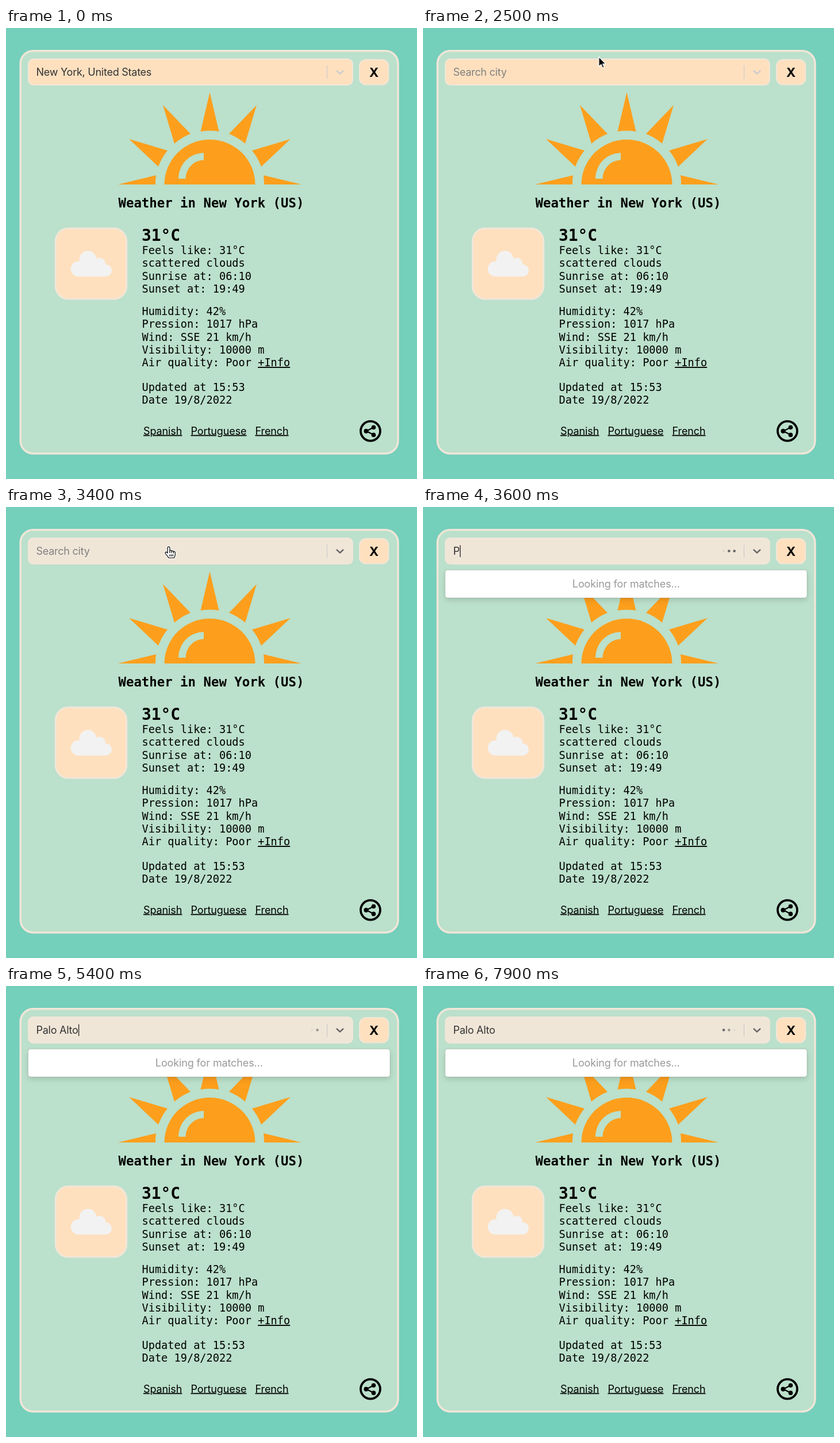
Animation, 715 px wide and 784 px high, one loop 8 s. Source, as an HTML page:

```html
<!DOCTYPE html>
<html lang="en">
<head>
<meta charset="utf-8">
<title>Weather</title>
<style>
  html, body { margin: 0; width: 100%; height: 100%; overflow: hidden; background: #74cfbb; }
  svg { display: block; width: 715px; height: 784px; }
  :root { --cream: #f0e6d8; --peach: #fee0bf; --mint: #bbe0cb; --teal: #74cfbb; }

  .ui { font: 18px Inter, "Open Sans", sans-serif; letter-spacing: -.25px; }
  .link { letter-spacing: -.1px; text-decoration: underline; }
  .mono { font: 18.63px "DejaVu Sans Mono", monospace; white-space: pre; }
  .title { font-size: 22.35px; font-weight: bold; }
  .temp { font-size: 27.9px; font-weight: bold; }
  .u { text-decoration: underline; }
  .box { fill: var(--peach); stroke: var(--cream); }

  .loop { animation: 8s linear infinite; }
  .button { animation-name: button; }
  .cross { animation-name: cross; font: bold 22px Inter, sans-serif; text-anchor: middle; }
  .field { animation-name: field; }
  .chevron { animation-name: chevron; fill: none; stroke-width: 2.6; stroke-linecap: round; stroke-linejoin: round; }
  .cursor { animation-name: move; }
  .hand { animation-name: hand; }
  .arrow { animation-name: arrow; }
  .ring { animation-name: ring; }
  .search { animation-name: search; }
  .lead2 { animation-name: lead2; }
  .lead3 { animation-name: lead3; }
  .hand, .arrow, .ring, .search, .lead2, .lead3 { animation-timing-function: step-end; }
  .menu { filter: drop-shadow(0 4px 5px rgba(0, 0, 0, .13)); }
  .dot { animation: pulse 1s ease-in-out infinite; }

  @keyframes button {
    0%, 14.7%, 30.5%, 100% { fill: #fee0bf; }
    17.3%, 28% { fill: #f0e6d8; }
  }
  @keyframes cross {
    0%, 14.7%, 30.5%, 100% { fill: #000; }
    17.3%, 28% { fill: #74cfbb; }
  }
  @keyframes field {
    0%, 32.2% { fill: #fee0bf; }
    35%, 100% { fill: #f0e6d8; }
  }
  @keyframes chevron {
    0%, 33.5% { stroke: #ccc; }
    36%, 100% { stroke: #666; }
  }
  @keyframes move {
    0%, 14.8% { transform: translate(659px, 76px); }
    16.2% { transform: translate(649px, 70px); }
    17.4%, 27.3% { transform: translate(643px, 67px); }
    28.75% { transform: translate(590px, 46px); }
    30% { transform: translate(430px, 42px); }
    31.25% { transform: translate(306px, 50px); }
    32.5% { transform: translate(290px, 58px); }
    33.75% { transform: translate(284px, 66px); }
    35%, 100% { transform: translate(283px, 69px); }
  }
  @keyframes hand {
    0%, 28.2%, 44.75%, 100% { visibility: hidden; }
    14.8%, 32.3% { visibility: visible; }
  }
  @keyframes arrow {
    0%, 32.3%, 100% { visibility: hidden; }
    28.2% { visibility: visible; }
  }
  @keyframes ring {
    0%, 24.8%, 100% { visibility: hidden; }
    23.6% { visibility: visible; }
  }
  @keyframes search {
    0% { visibility: hidden; }
    44.75%, 100% { visibility: visible; }
  }
  /* the later dots stay solid until their first pulse */
  @keyframes lead2 {
    0%, 45.9%, 100% { opacity: 0; }
    44.75% { opacity: 1; }
  }
  @keyframes lead3 {
    0%, 47.9%, 100% { opacity: 0; }
    44.75% { opacity: 1; }
  }
  @keyframes pulse {
    0%, 80%, 100% { opacity: 0; }
    40% { opacity: 1; }
  }
</style>
</head>
<body>
<svg viewBox="0 0 715 784">
  <rect width="715" height="784" fill="#74cfbb"/>
  <rect x="25.2" y="39.8" width="656.8" height="700" rx="22" fill="#bbe0cb" stroke="#f0e6d8" stroke-width="3.5"/>

  <g fill="#fd9f1c">
    <path d="M275.5 272A79 78 0 0 1 433.5 272Z"/>
    <path d="M354.5 112L370.5 180A94 94 0 0 0 338.5 180Z"/>
    <g id="rays">
      <path d="M436 134L416 201A94 94 0 0 0 388 184Z"/>
      <path d="M495 193L444 241A94 94 0 0 0 428 213Z"/>
      <path d="M514 272L449 272A94 94 0 0 0 448 256Z"/>
    </g>
    <use href="#rays" transform="matrix(-1 0 0 1 709 0)"/>
  </g>
  <path d="M300 262A44.5 45 0 0 1 344 217V229.5A32 32.5 0 0 0 312.5 262Z" fill="#bbe0cb"/>

  <text class="mono title" x="195.5" y="312">Weather in New York (US)</text>

  <rect class="box" x="86.3" y="348.3" width="123.4" height="122.8" rx="22" stroke-width="3"/>
  <g fill="#f2f2f2">
    <circle cx="126" cy="418.7" r="13.2"/>
    <circle cx="142.5" cy="402.5" r="15"/>
    <circle cx="163" cy="409.5" r="10"/>
    <circle cx="173.5" cy="421.4" r="10.5"/>
    <path d="M126 408H168L174 414V431.9H126Z"/>
  </g>

  <text class="mono temp" x="236" y="370">31°C</text>
  <text class="mono">
    <tspan x="236.5" y="393.2">Feels like: 31°C</tspan>
    <tspan x="236.5" y="415.3">scattered clouds</tspan>
    <tspan x="236.5" y="437.5">Sunrise at: 06:10</tspan>
    <tspan x="236.5" y="459.7">Sunset at: 19:49</tspan>
    <tspan x="236.5" y="499.2">Humidity: 42%</tspan>
    <tspan x="236.5" y="521.4">Pression: 1017 hPa</tspan>
    <tspan x="236.5" y="543.6">Wind: SSE 21 km/h</tspan>
    <tspan x="236.5" y="565.8">Visibility: 10000 m</tspan>
    <tspan x="236.5" y="588">Air quality: Poor <tspan class="u">+Info</tspan></tspan>
    <tspan x="236.5" y="631">Updated at 15:53</tspan>
    <tspan x="236.5" y="653.2">Date 19/8/2022</tspan>
  </text>

  <text class="ui link" x="239" y="706.5">Spanish</text>
  <text class="ui link" x="321.5" y="706.5">Portuguese</text>
  <text class="ui link" x="433.5" y="706.5">French</text>

  <g fill="none" stroke="#000">
    <circle cx="634" cy="700.6" r="17" stroke-width="3.8"/>
    <path d="M639.5 694.3L627 700.8L639.5 707.3" stroke-width="2.4"/>
  </g>
  <circle cx="626.5" cy="700.8" r="4"/>
  <circle cx="639.5" cy="694.2" r="3.8"/>
  <circle cx="639.5" cy="707.4" r="3.8"/>

  <rect class="box loop field" x="39" y="54" width="564" height="45" rx="8.5" stroke-width="2"/>
  <path d="M558.5 65V88.5" stroke="#ccc" stroke-width="1.2"/>
  <path class="loop chevron" d="M575.7 74.6L581 79.6L586.3 74.6"/>
  <rect class="box loop button" x="615" y="55" width="50.5" height="43.5" rx="11" stroke-width="2"/>
  <text class="loop cross" x="640" y="85">X</text>

  <text class="ui" id="entry" x="52.5" y="83.3"></text>
  <rect id="caret" y="66.5" width="1.3" height="20.5" fill="#222"/>

  <g class="loop search">
    <rect class="menu" x="38.5" y="109.5" width="629.5" height="48.5" rx="4.5" fill="#fff" stroke="#000" stroke-opacity=".15"/>
    <text class="ui" x="353.3" y="140" text-anchor="middle" fill="#999" style="letter-spacing:-.12px">Looking for matches...</text>
    <g fill="#666">
      <circle class="dot" cx="523.1" cy="76.5" r="2.3" style="animation-delay:-485ms"/>
      <circle class="dot" cx="532.4" cy="76.5" r="2.3" style="animation-delay:-325ms"/>
      <circle class="dot" cx="541.7" cy="76.5" r="2.3" style="animation-delay:-165ms"/>
      <circle class="loop lead2" cx="532.4" cy="76.5" r="2.3"/>
      <circle class="loop lead3" cx="541.7" cy="76.5" r="2.3"/>
    </g>
  </g>

  <g class="loop cursor" stroke-linejoin="round">
    <circle class="loop ring" r="36" fill="none" stroke="#000" stroke-opacity=".5" stroke-width="2.5"/>
    <g class="loop hand">
      <path id="palm" d="M-1.9 11V2A1.9 1.9 0 0 1 1.9 2V8.2A1.6 1.6 0 0 1 5.1 7.8V8.8A1.6 1.6 0 0 1 8.3 8.8V9.8A1.5 1.5 0 0 1 11.3 10V14C11.3 16.5 9.8 17.5 9.5 19.5H0C-1 17-4 14.5-5.6 12A1.6 1.6 0 0 1-3.2 9.8Z" fill="#fff" stroke="#fff" stroke-width="2.6"/>
      <use href="#palm" style="stroke-width:1.2"/>
      <path d="M-1.9 11V2A1.9 1.9 0 0 1 1.9 2V8.2A1.6 1.6 0 0 1 5.1 7.8V8.8A1.6 1.6 0 0 1 8.3 8.8V9.8A1.5 1.5 0 0 1 11.3 10V14C11.3 16.5 9.8 17.5 9.5 19.5H0C-1 17-4 14.5-5.6 12A1.6 1.6 0 0 1-3.2 9.8ZM1.9 8V11M5.1 8.5V11M8.3 9.5V11.5M2 13.2V17M4.7 13.2V17M7.4 13.2V17" fill="none" stroke="#000" stroke-width="1.2"/>
    </g>
    <path class="loop arrow" d="M0 0V17L4 13.3L6.6 19.2L9.2 18L6.7 12.3H12Z" fill="#000" stroke="#fff" stroke-width="1.2"/>
  </g>
</svg>
<script>
  const LOOP = 8000;
  const CITY = "Palo Alto";
  const KEYS = [3580, 3780, 3980, 4180, 4480, 4680, 4880, 4980, 5180];
  const LAST = KEYS[KEYS.length - 1];
  const entry = document.getElementById("entry");
  const caret = document.getElementById("caret");
  let start;

  function entryAt(t) {
    if (t < 1890) return ["New York, United States", "#333"];
    if (t < KEYS[0]) return ["Search city", "#808080"];
    return [CITY.slice(0, KEYS.filter(k => k <= t).length), "#333"];
  }

  function caretOn(t) {
    if (t < KEYS[0]) return t >= 2880 && t < 3380;
    return t < LAST || (t - LAST) % 1000 < 500;
  }

  function draw(now) {
    start ??= now;
    const t = (now - start) % LOOP;
    const [text, color] = entryAt(t);
    if (entry.textContent !== text) {
      entry.textContent = text;
      entry.setAttribute("fill", color);
    }
    // a trailing space still moves the caret
    entry.style.whiteSpace = "pre";
    const width = t < KEYS[0] ? 0 : entry.getComputedTextLength();
    caret.setAttribute("x", 52.8 + width);
    caret.setAttribute("visibility", caretOn(t) ? "visible" : "hidden");
    requestAnimationFrame(draw);
  }
  requestAnimationFrame(draw);
</script>
</body>
</html>
```
